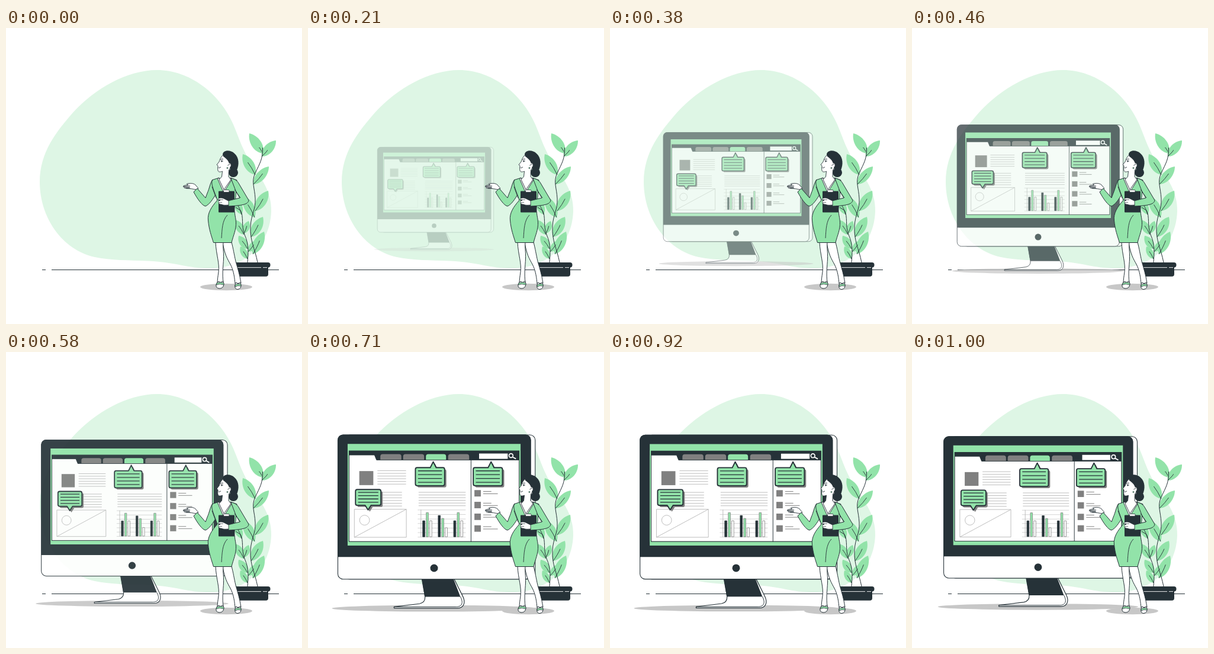
These frames come from a looping animation (500x500 px, 1040 ms). An HTML page with a canvas:

```html
<!DOCTYPE html>
<html lang="en">
<head>
<meta charset="utf-8">
<title>Presenting a page</title>
<style>
html, body { margin: 0; width: 100%; height: 100%; overflow: hidden; background: #fff; }
canvas { display: block; width: 100vw; height: 100vh; }
</style>
</head>
<body>
<canvas id="stage" width="500" height="500"></canvas>
<script>
const SIZE = 500, LOOP = 1040, STEP = 41.6;
const DARK = '#263238', GREEN = '#92e3a9', PALE = '#def6e5', GRAY = '#808080',
      SHADE = '#c7c7c7', RULE = '#b5b5b5', WHITE = '#fff';

const view = document.getElementById('stage').getContext('2d');
const layer = document.createElement('canvas');
layer.width = layer.height = SIZE;
const screenCtx = layer.getContext('2d');
let g = view;

function shape(d, fill, stroke, width = 1) {
  const path = new Path2D(d);
  if (fill) { g.fillStyle = fill; g.fill(path); }
  if (stroke) { g.strokeStyle = stroke; g.lineWidth = width; g.stroke(path); }
}

function box(x, y, w, h, r, fill, stroke, width = 1) {
  g.beginPath();
  g.roundRect(x, y, w, h, r);
  if (fill) { g.fillStyle = fill; g.fill(); }
  if (stroke) { g.strokeStyle = stroke; g.lineWidth = width; g.stroke(); }
}

function oval(x, y, rx, ry, fill, stroke, width = 1) {
  g.beginPath();
  g.ellipse(x, y, rx, ry, 0, 0, Math.PI * 2);
  if (fill) { g.fillStyle = fill; g.fill(); }
  if (stroke) { g.strokeStyle = stroke; g.lineWidth = width; g.stroke(); }
}

function line(x1, y1, x2, y2, color = DARK, width = 1) {
  shape(`M${x1} ${y1}L${x2} ${y2}`, null, color, width);
}

function rules(x1, x2, y, gap, count, color, width) {
  for (let i = 0; i < count; i++) line(x1, y + i * gap, x2, y + i * gap, color, width);
}

// Cubic easing with a small overshoot before it settles
function ease(x) {
  if (x >= 1) return 1;
  const at = (u, a, b) => 3 * (1 - u) * (1 - u) * u * a + 3 * (1 - u) * u * u * b + u * u * u;
  let lo = 0, hi = 1;
  for (let i = 0; i < 30; i++) {
    const mid = (lo + hi) / 2;
    if (at(mid, 0.36, 0.5) < x) lo = mid; else hi = mid;
  }
  return at(lo, -0.01, 1.38);
}

function backdrop() {
  g.fillStyle = WHITE;
  g.fillRect(0, 0, SIZE, SIZE);
  shape('M255 71C310 71 361 110 384 163C394 187 400 207 415 230C432 255 449 277 448 310' +
    'C446 365 405 406 345 406C305 406 290 396 240 393.5C205 392 180 393 150 387' +
    'C95 375 57 320 57 260C57 210 85 175 113 143C150 102 205 71 255 71Z', PALE);
  line(61, 408.5, 67, 408.5);
  line(77, 408.5, 461, 408.5);
}

function bubble(x, y, w, h, tip, dir) {
  const r = x + w, b = y + h, k = 3;
  const up = dir < 0 ? `L${tip - 5} ${y}L${tip} ${y - 10}L${tip + 5} ${y}` : '';
  const down = dir > 0 ? `L${tip + 5} ${b}L${tip} ${b + 8}L${tip - 5} ${b}` : '';
  const d = `M${x + k} ${y}${up}L${r - k} ${y}Q${r} ${y} ${r} ${y + k}L${r} ${b - k}` +
    `Q${r} ${b} ${r - k} ${b}${down}L${x + k} ${b}Q${x} ${b} ${x} ${b - k}L${x} ${y + k}Q${x} ${y} ${x + k} ${y}Z`;
  g.save();
  g.translate(3, 3);
  shape(d, GRAY);
  g.restore();
  shape(d, GREEN, DARK, 1.9);
  rules(x + 4.5, r - 4.5, y + h * 0.18, h * 0.21, 4, DARK, 1.3);
}

function tab(x, w, color) {
  box(x, 171, w, 9.5, [4, 4, 0, 0], color);
}

function chart() {
  rules(185, 267, 266.5, 7.75, 7, '#c9c9c9', 0.8);
  line(190.5, 266, 190.5, 313, RULE, 0.9);
  const tops = [[285, 271, 285], [276, 281, 297], [285, 271, 285]];
  tops.forEach((set, i) => set.forEach((top, j) => {
    const x = 193.5 + i * 26.5 + j * 6;
    box(x, top, 3.7, 312.5 - top, 0, [DARK, GREEN, WHITE][j], j ? GRAY : DARK, 0.8);
  }));
}

function page() {
  box(65, 153.5, 296, 174, 0, GREEN);
  box(67, 165, 292, 156, 0, DARK);
  shape('M67.5 172.5H111L114.5 181H358.5V320.5H67.5Z', WHITE, DARK, 0.9);
  tab(121, 36, GRAY);
  tab(160, 36, GRAY);
  tab(199, 34.5, GREEN);
  tab(237, 36, GRAY);
  box(290, 170, 49, 9, 0, WHITE);
  oval(344.6, 173.5, 3.4, 3.4, null, WHITE, 1.7);
  line(347.5, 176, 353, 179, WHITE, 1.9);
  line(276.2, 181, 276.2, 321, DARK, 1);

  box(85, 200, 24, 24, 0, GRAY);
  rules(116, 165, 199.3, 4.6, 6, RULE, 0.9);
  rules(116, 158, 236.3, 4.7, 6, RULE, 0.9);
  rules(186.5, 267, 236.3, 4.6, 6, RULE, 0.9);
  box(76.5, 265.3, 89, 48, 0, null, RULE, 0.9);
  line(76.5, 313.3, 165.5, 265.3, RULE, 0.9);
  oval(94, 284, 8.5, 8.5, WHITE, RULE, 0.9);
  chart();

  for (let i = 0; i < 4; i++) {
    const y = 232.5 + i * 20.1;
    box(282, y, 11, 11, 0, GRAY);
    line(297, y + 2.3, 311, y + 2.3, GRAY, 1);
    line(297, y + 6.3, 322, y + 6.3, GRAY, 1);
  }
  bubble(181, 194, 50, 31, 211.5, -1);
  bubble(280, 194, 50, 31, 310.5, -1);
  bubble(78.5, 231.5, 43.5, 27, 100, 1);
}

function monitor() {
  oval(213, 435, 175, 5.5, SHADE);
  shape('M192 384H247L262 414C268 426 263 434.5 253 434.5H144.5V432.3L188 427Q198 425 197.5 415Z', WHITE, DARK, 1.2);
  shape('M192 384H246L258 415H197Z', DARK);
  shape('M258 415C264 426 260 432.3 251 432.3H144.5', null, DARK, 1);
  box(60, 138, 326, 247, 9, WHITE, DARK, 1.1);
  box(48.3, 138, 330, 247, 9, WHITE, DARK, 1.1);
  box(48, 137.5, 330.5, 209.5, [9, 9, 0, 0], DARK);
  oval(213, 366, 6.6, 6.6, DARK);
  page();
}

function leaf(bx, by, tx, ty, w, vein = 0.6) {
  const dx = tx - bx, dy = ty - by, len = Math.hypot(dx, dy);
  const nx = -dy / len * w, ny = dx / len * w;
  const at = (f, s) => `${bx + dx * f + nx * s} ${by + dy * f + ny * s}`;
  shape(`M${bx} ${by}C${at(0.25, 1.3)} ${at(0.72, 1.2)} ${tx} ${ty}C${at(0.72, -1.2)} ${at(0.25, -1.3)} ${bx} ${by}Z`, GREEN);
  shape(`M${bx} ${by}Q${at(0.35, 0.15)} ${at(vein, 0)}`, null, DARK, 0.9);
}

function plant() {
  leaf(434, 212, 411, 178, 9, 0.28);
  leaf(432, 217, 456, 190, 8, 0.4);
  leaf(421, 248, 400, 213, 9);
  leaf(418, 264, 444, 234, 8);
  leaf(420, 320, 401, 284, 9);
  leaf(421, 309, 443, 275, 9);
  leaf(414, 353, 434, 319, 9);
  leaf(417, 382, 436, 344, 9);
  leaf(398, 315, 387, 288, 7);
  leaf(402, 349, 387, 324, 7);
  leaf(402, 347, 410, 326, 6);
  leaf(408, 373, 393, 351, 7);
  leaf(409, 378, 425, 358, 6);
  leaf(408, 390, 396, 369, 6);
  shape('M425 396C420 371 412 360 413 335C414 315 422 307 421 288C420 269 414 260 421 245C429 228 434 221 433.5 202', null, DARK, 1);
  shape('M408 396C409 380 411 367 403 349C397 334 402 318 396 308L388 303', null, DARK, 1);
  box(391, 400, 52, 19.8, [0, 0, 4, 4], DARK);
  box(385, 396, 61.5, 8.5, 4, DARK);
  line(388, 404.6, 431, 404.6, WHITE, 0.9);
  line(434, 404.6, 441, 404.6, WHITE, 0.9);
}

function legs() {
  shape('M366 362C369 382 374 390 379 399C385 411 386 422 387 432L397 431C395 417 391 405 388 394C385 381 384 373 381 362Z', WHITE, DARK);
  shape('M354 362C355 383 361 397 359 412C358 420 357 425 357 431L367 430C365 415 367 402 367.5 390C368 378 366 371 367 362Z', WHITE, DARK);
  shape('M358 428C354 433 353 439 360 440C367 440 369 435 367 428Q362 431 358 428Z', WHITE, DARK);
  shape('M356 431Q362 428 368 431L368 434Q361 431 355 434Z', GREEN, DARK, 0.8);
  shape('M388 430C386 436 386 441 391 441.5C397 441 398 436 396 430Q392 433 388 430Z', WHITE, DARK);
  shape('M387 434Q392 431 397 433L397 436Q392 434 387 437Z', GREEN, DARK, 0.8);
}

function head() {
  shape('M367 214C362 219 361 223 360 226L356 231L358.2 233C357.3 236 357.5 239 358.3 241.5C359.5 244 363 243 365.5 242L364.5 251L360 256L368 273L380 256L376 251L376.5 240L383 230L376 215Z', WHITE, DARK, 0.9);
  shape('M366 214C366 206 379 205 386 212C394 219 394 231 390 240L379 239L377 230C376 223 370 219 367 217Z', DARK);
  oval(384, 244.3, 8, 7.7, DARK);
  oval(376.4, 231.7, 3.4, 3.5, WHITE);
  shape('M375 233C375 230 378 229 378.5 231', null, DARK, 0.8);
  oval(374, 236.5, 1.1, 1.1, GREEN, DARK, 0.7);
  shape('M362 222.5Q364 220.5 367 221.5', null, DARK, 0.9);
  oval(364.5, 225.2, 0.9, 1.3, DARK);
  shape('M362.5 224.3Q365 223 367 225', null, DARK, 0.7);
  shape('M358.5 236Q361 237 363 234.8', null, DARK, 0.9);
}

function woman() {
  oval(372, 437.5, 44, 5.7, SHADE);
  legs();
  // pointing arm and hand
  shape('M321 273C316 272 311 271 306 271C302 271 299 269 299.5 267C302 265 306 266 308 265C306 264 304 264 306 263C311 262 317 262 320 265L325 271Z', WHITE, DARK, 0.9);
  shape('M300 267.5L311 267M301 269L310 269.3M304 270.5L311 270', null, DARK, 1);
  shape('M349 256C345 261 344 270 340 279L337 287L323 271L317 277C323 288 331 300 337 301C344 298 350 288 355 280Z', GREEN, DARK);
  // dress
  shape('M360 253L349 256.5C346 261 349 269 352 277L357 291C347 302 340 313 341.5 325C343 341 347 351 350.5 362.5H381C384 350 389 341 388.5 328C388 318 384 309 387 297L390 257L379 253L368 275Z', GREEN, DARK);
  shape('M360 253L357.5 255L367.5 278L382 255L378 253L368 271Z', WHITE, DARK, 0.9);
  shape('M348 268Q351 277 355 287M374 316C365 325 365 341 364 355', null, DARK, 0.9);
  head();
  // clipboard and near arm
  box(359, 275.5, 27, 36, 1, DARK);
  box(367.5, 273.5, 9.5, 3.8, 1, WHITE, DARK, 0.8);
  shape('M380 254C387 255 391 258 394 264L410 291C409 298 399 300 376 301L375 292L395 287L388 275Z', GREEN, DARK);
  shape('M386 273L396 287', null, DARK, 0.9);
  shape('M376 292C371 290 367 287 364 287C360 287 358 288 358 290L362 291C358 292 358 294 359.5 295C359 297 361 298 364 298C368 300 372 299 376 299Z', WHITE, DARK, 0.8);
  shape('M359 290H367M359.5 295L365 294.5', null, DARK, 0.7);
}

function render(time) {
  const tick = Math.floor((time % LOOP + 2.5) / STEP);
  g = view;
  backdrop();
  if (tick >= 3) {
    const p = ease((tick + 0.65) / 24);
    const scale = (0.5 + 0.5 * p) / 1.033;
    g = screenCtx;
    g.setTransform(1, 0, 0, 1, 0, 0);
    g.clearRect(0, 0, SIZE, SIZE);
    g.translate(213, 289.5);
    g.scale(scale, scale);
    g.translate(-213, -289.5);
    monitor();
    g = view;
    g.globalAlpha = Math.min(1, p);
    g.drawImage(layer, 0, 0);
    g.globalAlpha = 1;
  }
  plant();
  woman();
}

const start = performance.now();
function loop() {
  render(performance.now() - start);
  requestAnimationFrame(loop);
}
view.lineJoin = screenCtx.lineJoin = 'round';
loop();
</script>
</body>
</html>
```
